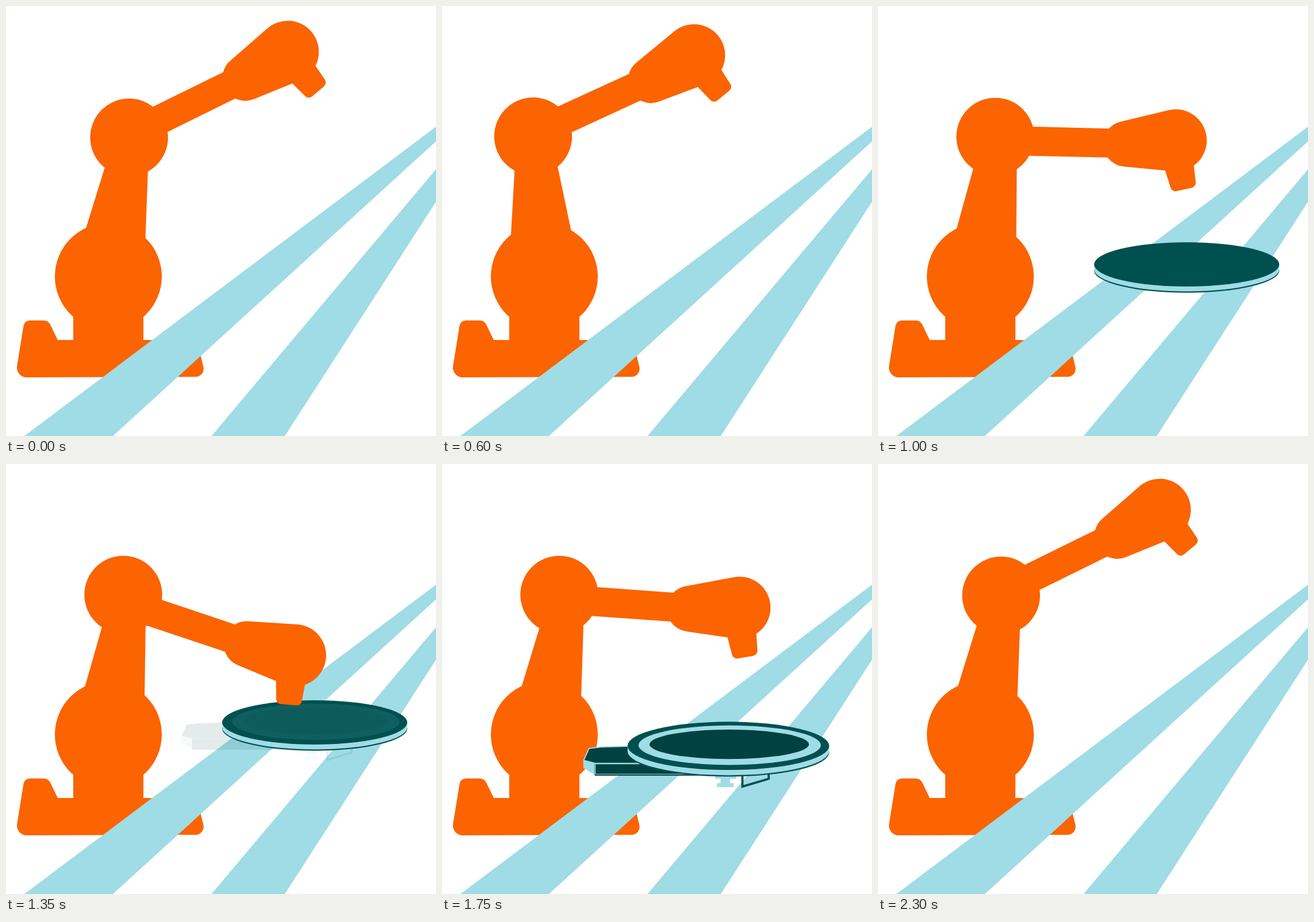
Animation of 748 by 748 pixels, one loop 2.45 s. Source, as an HTML page with a canvas:

```html
<!DOCTYPE html>
<html lang="en">
<head>
<meta charset="utf-8">
<title>Robot arm at a conveyor</title>
<style>
  html, body { margin: 0; width: 100%; height: 100%; overflow: hidden; background: #fff; }
  canvas { display: block; width: 748px; height: 748px; }
</style>
</head>
<body>
<canvas id="stage" width="748" height="748"></canvas>
<script>
const ctx = document.getElementById('stage').getContext('2d');
const SIZE = 748, LOOP = 2450, MOTION = 2300, STEP = 50;
const ORANGE = '#fb6400', LIGHT = '#a0dce5', TEAL = '#005050', DEEP = '#004242';
const RAD = Math.PI / 180;
const BASE = { x: 178, y: 470.5 };
const SHOULDER = { x: 214, y: 229 };

const progress = (t, from, to) => Math.min(1, Math.max(0, (t - from) / (to - from)));
const ease = (t, from, to) => (1 - Math.cos(Math.PI * progress(t, from, to))) / 2;

function poly(color, ...points) {
  ctx.fillStyle = color;
  ctx.beginPath();
  points.forEach(point => ctx.lineTo(...point));
  ctx.closePath();
  ctx.fill();
}

function rect(color, ...box) {
  ctx.fillStyle = color;
  ctx.fillRect(...box);
}

function ellipse(color, x, y, rx, ry = rx) {
  ctx.fillStyle = color;
  ctx.beginPath();
  ctx.ellipse(x, y, rx, ry, 0, 0, 2 * Math.PI);
  ctx.fill();
}

function outline(color, width) {
  ctx.strokeStyle = color;
  ctx.lineWidth = width;
  ctx.stroke();
}

// Two circles joined by their outer tangents.
function limb(x0, y0, r0, x1, y1, r1) {
  const axis = Math.atan2(y1 - y0, x1 - x0);
  const spread = Math.acos((r0 - r1) / Math.hypot(x1 - x0, y1 - y0));
  ctx.fillStyle = ORANGE;
  ctx.beginPath();
  ctx.arc(x0, y0, r0, axis + spread, axis - spread);
  ctx.arc(x1, y1, r1, axis - spread, axis + spread);
  ctx.fill();
}

// Each corner is [x, y, radius].
function roundedPoly(color, ...corners) {
  const first = corners[0], last = corners[corners.length - 1];
  ctx.fillStyle = color;
  ctx.beginPath();
  ctx.moveTo((first[0] + last[0]) / 2, (first[1] + last[1]) / 2);
  corners.forEach(([x, y, r = 0], i) => {
    const [nextX, nextY] = corners[(i + 1) % corners.length];
    ctx.arcTo(x, y, nextX, nextY, r);
  });
  ctx.closePath();
  ctx.fill();
}

function rotateAround(x, y, degrees) {
  ctx.translate(x, y);
  ctx.rotate(degrees * RAD);
  ctx.translate(-x, -y);
}

function drawBase() {
  roundedPoly(ORANGE, [32, 547, 11], [73.5, 547, 13], [90, 581], [332, 581], [347.5, 645, 14], [16, 646, 17]);
  rect(ORANGE, 117, 520, 122, 70);
  ellipse(ORANGE, BASE.x, BASE.y, 93);
}

function drawLowerArm(t) {
  const angle = -15.3 * ease(t, 0, 500) + 13.6 * ease(t, 500, 1000) + 1.7 * ease(t, 1000, 2050);
  ctx.save();
  rotateAround(BASE.x, BASE.y, angle);
  limb(BASE.x, BASE.y, 62, 219, 230, 30);
  ctx.restore();
}

function drawUpperArm(t) {
  const lean = 8.5 - 14.3 * ease(t, 0, 500) + 11.9 * ease(t, 500, 980) + 2.4 * ease(t, 1850, 2300);
  const dip = ease(t, 0, 500) + 43.7 * ease(t, 545, 1345) - 44.7 * ease(t, 1415, 2287);
  const reach = 244.5;
  ctx.save();
  ctx.translate(
    BASE.x + reach * Math.sin(lean * RAD) - SHOULDER.x,
    BASE.y - reach * Math.cos(lean * RAD) - SHOULDER.y
  );
  ellipse(ORANGE, SHOULDER.x, SHOULDER.y, 67.7);
  rotateAround(SHOULDER.x - 22, SHOULDER.y + 6, dip);
  limb(212, 225, 25.4, 415.5, 125, 25.2);
  limb(416, 125.5, 39.7, 490, 80, 54);
  roundedPoly(ORANGE, [538, 104], [559, 135, 9], [526, 163, 9], [497, 134], [500, 100]);
  ctx.restore();
}

// A strip from the bottom edge towards its vanishing point.
function drawRail(left, right, vanishX, vanishY) {
  poly(LIGHT, [left, SIZE], [vanishX, vanishY], [right, SIZE]);
}

// Parts below the disc, relative to its centre.
function drawUnderbody() {
  poly(LIGHT, [-331, 32], [-304, 40], [-304, 67], [-331, 50]);
  poly(DEEP, [-330, 33], [-318, 6], [-291, 2.5], [-190, 0], [-180, 40], [-304, 40]);
  outline(LIGHT, 2.5);
  rect(DEEP, -305, 41, 260, 27);
  ctx.beginPath();
  ctx.rect(-303.5, 41, 260, 23.5);
  outline(LIGHT, 1.5);

  rect(LIGHT, -30, 65, 48, 10);
  rect(LIGHT, -18, 73, 22, 14);
  rect(LIGHT, -26, 85, 38, 9);

  ctx.beginPath();
  [[32, 60], [32, 93], [92, 75], [92, 60]].forEach(point => ctx.lineTo(...point));
  outline(TEAL, 5);
}

function drawPlate(t) {
  const travel = 300 * (progress(t, 600, 970) - 1) + 0.523 * Math.max(0, t - 1672);
  const scale = (161 + 0.352 * travel) / 230;
  const fade = progress(t, 1320, 1620);

  ctx.save();
  ctx.translate(537 - 0.952 * travel, 449.5 + travel);
  ctx.scale(scale, scale);
  ctx.globalAlpha = fade;
  drawUnderbody();

  ctx.globalAlpha = 1;
  ellipse(TEAL, 0, 15.2, 230, 55);
  ellipse(LIGHT, 0, 12, 230, 55);
  rect(LIGHT, -230, 0, 460, 12);
  ellipse(TEAL, 0, 0, 230, 55);

  ctx.globalAlpha = fade;
  ellipse(LIGHT, 3, -1.5, 208, 45);
  ellipse(DEEP, 2, -3.5, 182, 33.5);
  ctx.restore();
}

function draw(t) {
  rect('#fff', 0, 0, SIZE, SIZE);
  drawBase();
  drawLowerArm(t);
  drawRail(32, 186, 907, 90.6);
  drawRail(357.5, 485, 904.5, 98);
  drawPlate(t);
  drawUpperArm(t);
}

const start = performance.now();
function tick() {
  const elapsed = (performance.now() - start) % LOOP;
  const stepped = Math.floor(elapsed / STEP) * STEP;
  // The rest pose is held from the end of the motion until the loop restarts.
  draw(stepped < MOTION ? stepped : 0);
  requestAnimationFrame(tick);
}
tick();
</script>
</body>
</html>
```
